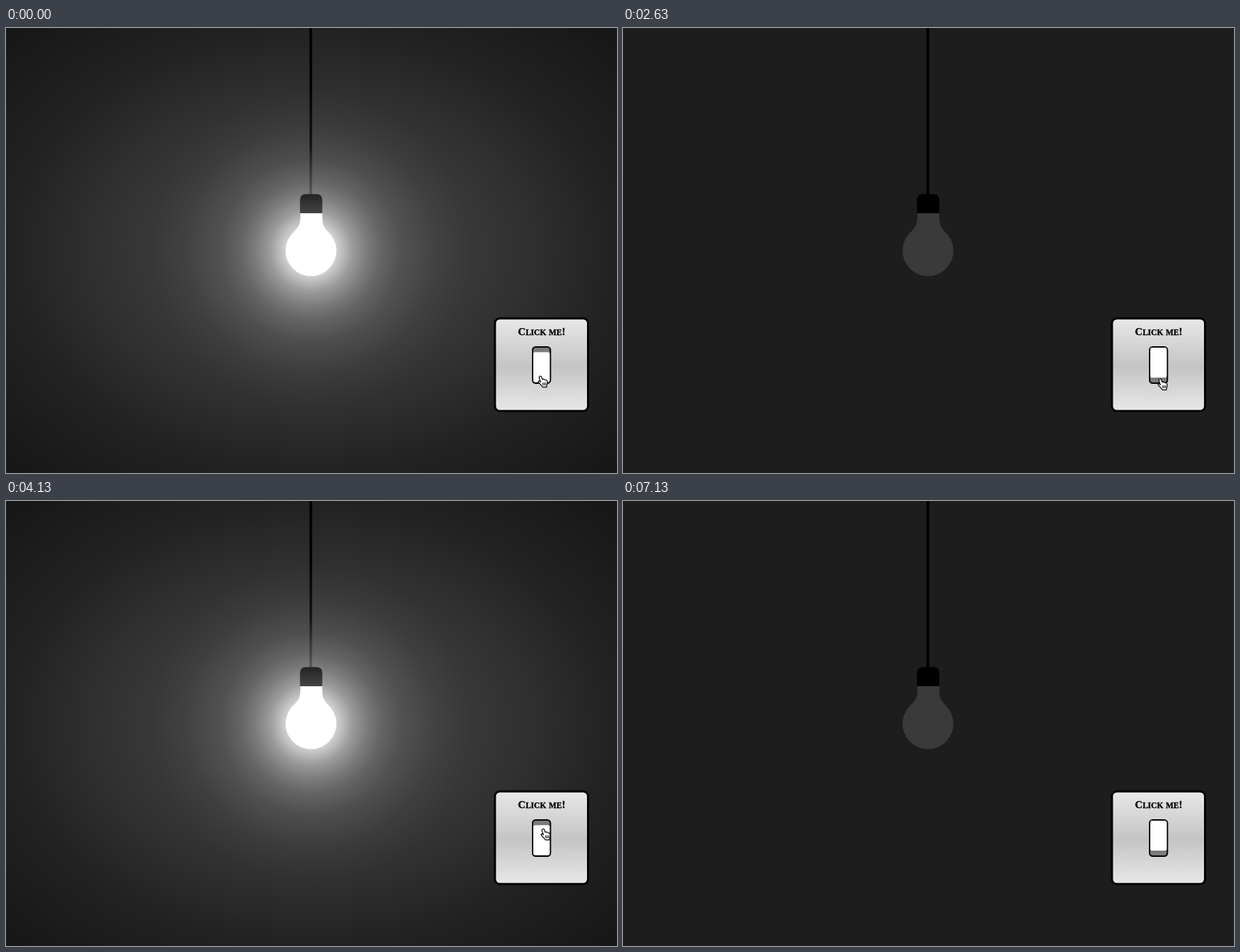
An HTML page that plays this animation: 876x639 px, repeating every 7160 ms.

```html
<!DOCTYPE html>
<html lang="en">
<head>
<meta charset="utf-8">
<title>Light switch</title>
<style>
html, body { margin: 0; width: 100%; height: 100%; overflow: hidden; background: #1d1d1d; }
svg { display: block; width: 876px; height: 639px; }
.lit { visibility: hidden; }
.on .lit { visibility: visible; }
.bulb { fill: #3a3a3a; }
.on .bulb { fill: #fff; }
.cord, .cap { fill: #000; }
.on .cord { fill: url(#cordLit); }
.on .cap { fill: url(#capLit); }
.on .knob { transform: translateY(6.5px); }
text { font: bold 15px "Liberation Serif", "Times New Roman", serif; text-anchor: middle; stroke: #000; stroke-width: .35; }
.small { font-size: 11.6px; }
</style>
</head>
<body>
<svg id="stage" viewBox="0 0 876 639">
  <defs>
    <radialGradient id="room" gradientUnits="userSpaceOnUse" cx="0" cy="0" r="1"
      gradientTransform="translate(437.5 320) scale(619 452)">
      <stop offset="0" stop-color="#434343"/>
      <stop offset=".25" stop-color="#3f3f3f"/>
      <stop offset=".5" stop-color="#303030"/>
      <stop offset=".7" stop-color="#222"/>
      <stop offset="1" stop-color="#161616"/>
    </radialGradient>
    <radialGradient id="halo" gradientUnits="userSpaceOnUse" cx="437.5" cy="319" r="230">
      <stop offset=".15" stop-color="#fff" stop-opacity=".78"/>
      <stop offset=".26" stop-color="#fff" stop-opacity=".47"/>
      <stop offset=".35" stop-color="#fff" stop-opacity=".31"/>
      <stop offset=".44" stop-color="#fff" stop-opacity=".19"/>
      <stop offset=".57" stop-color="#fff" stop-opacity=".09"/>
      <stop offset=".78" stop-color="#fff" stop-opacity=".025"/>
      <stop offset="1" stop-color="#fff" stop-opacity="0"/>
    </radialGradient>
    <linearGradient id="cordLit" gradientUnits="userSpaceOnUse" x1="0" y1="0" x2="0" y2="239">
      <stop offset=".3" stop-color="#000"/>
      <stop offset=".7" stop-color="#161616"/>
      <stop offset="1" stop-color="#5a5a5a"/>
    </linearGradient>
    <linearGradient id="capLit" x1="0" y1="0" x2="0" y2="1">
      <stop offset="0" stop-color="#232323"/>
      <stop offset="1" stop-color="#444"/>
    </linearGradient>
    <linearGradient id="metal" x1="0" y1="0" x2="0" y2="1">
      <stop offset="0" stop-color="#e8e8e8"/>
      <stop offset=".52" stop-color="#c4c4c4"/>
      <stop offset="1" stop-color="#e8e8e8"/>
    </linearGradient>
  </defs>

  <rect width="876" height="639" fill="#1d1d1d"/>
  <g class="lit">
    <rect width="876" height="639" fill="url(#room)"/>
    <circle cx="437.5" cy="319" r="230" fill="url(#halo)"/>
  </g>

  <rect class="cord" x="435" width="4" height="240"/>
  <path class="bulb" d="M422 265H453.5V272C453.5 282 456 287 462 293A36.5 36.5 0 1 1 412.5 293C419 287 422 282 422 272Z"/>
  <path class="cap" d="M421.5 266V247Q421.5 238.5 430 238.5H445Q453.5 238.5 453.5 247V266Z"/>

  <rect x="701" y="417" width="133.5" height="133" rx="7" fill="url(#metal)" stroke="#000" stroke-width="3"/>
  <text x="768" y="441">C<tspan class="small">LICK</tspan> <tspan class="small">ME</tspan>!</text>
  <rect x="755" y="458" width="25.5" height="52" rx="4.5" fill="#7b7b7b" stroke="#000" stroke-width="2"/>
  <rect class="knob" x="756" y="459" width="23.5" height="43" rx="2.5" fill="#fff"/>

  <g id="cursor" stroke-linejoin="round" stroke-linecap="round">
    <g id="hand" transform="translate(-4 -1)" stroke="#000">
      <path fill="#fff" stroke-width="1.2" d="M3.6 1C5 .6 5.8 1.5 6.1 2.6L7 5.6C7.6 5 9 5 9.4 6C10 5.5 11.3 5.7 11.6 6.7C12.5 6.3 13.6 6.8 13.9 8C14.4 10 14.3 12 13.4 14L13 16.6H7.2C6.5 14.8 3.5 12.5 1.4 9.6C.6 8.3 2.2 7.4 3.3 8.4L4.4 9.4L2.4 3C2.1 2 2.6 1.2 3.6 1Z"/>
      <path fill="none" d="M7.8 10.6V14M9.8 10.6V14M11.8 10.6V14"/>
    </g>
    <path id="arrow" fill="#000" stroke="#fff" d="M0 0V14.5L3.3 11.4L5.6 16.6L8 15.6L5.8 10.5H10.5Z"/>
  </g>
</svg>
<script>
const LOOP = 7160, FRAME = 100 / 3;
const lights = [[0, 1470], [2800, 4170]];
// time, x, y of the pointer tip
const path = [
  [0, 766, 500], [500, 766, 500], [733, 766, 470],
  [1967, 766, 470], [2033, 768, 486], [2067, 771, 505], [2100, 773, 517],
  [2133, 774, 513], [2200, 775, 508],
  [2400, 775, 508], [2633, 770, 504],
  [3300, 770, 504], [3533, 770, 471],
  [4467, 770, 471], [4500, 768, 477], [4533, 763, 497], [4567, 754, 535], [4600, 737, 601]
];
const GONE = 4630;
const $ = id => document.getElementById(id);
const stage = $("stage"), cursor = $("cursor"), hand = $("hand"), arrow = $("arrow");
const show = (el, yes) => { el.style.display = yes ? "" : "none"; };

function tipAt(t) {
  const i = path.findIndex(p => p[0] > t);
  if (i < 0) return path[path.length - 1].slice(1);
  const a = path[i - 1], b = path[i], k = (t - a[0]) / (b[0] - a[0]);
  return [1, 2].map(n => Math.round(a[n] + (b[n] - a[n]) * k));
}

function draw(t) {
  stage.classList.toggle("on", lights.some(([from, to]) => t >= from && t < to));
  show(cursor, t < GONE);
  const [x, y] = tipAt(Math.floor((t + 4) / FRAME) * FRAME);
  const over = x > 753 && x < 782 && y > 456 && y < 512;
  show(hand, over);
  show(arrow, !over);
  cursor.setAttribute("transform", `translate(${x} ${y})`);
}

const start = performance.now();
function tick() {
  draw((performance.now() - start) % LOOP);
  requestAnimationFrame(tick);
}
tick();
</script>
</body>
</html>
```
